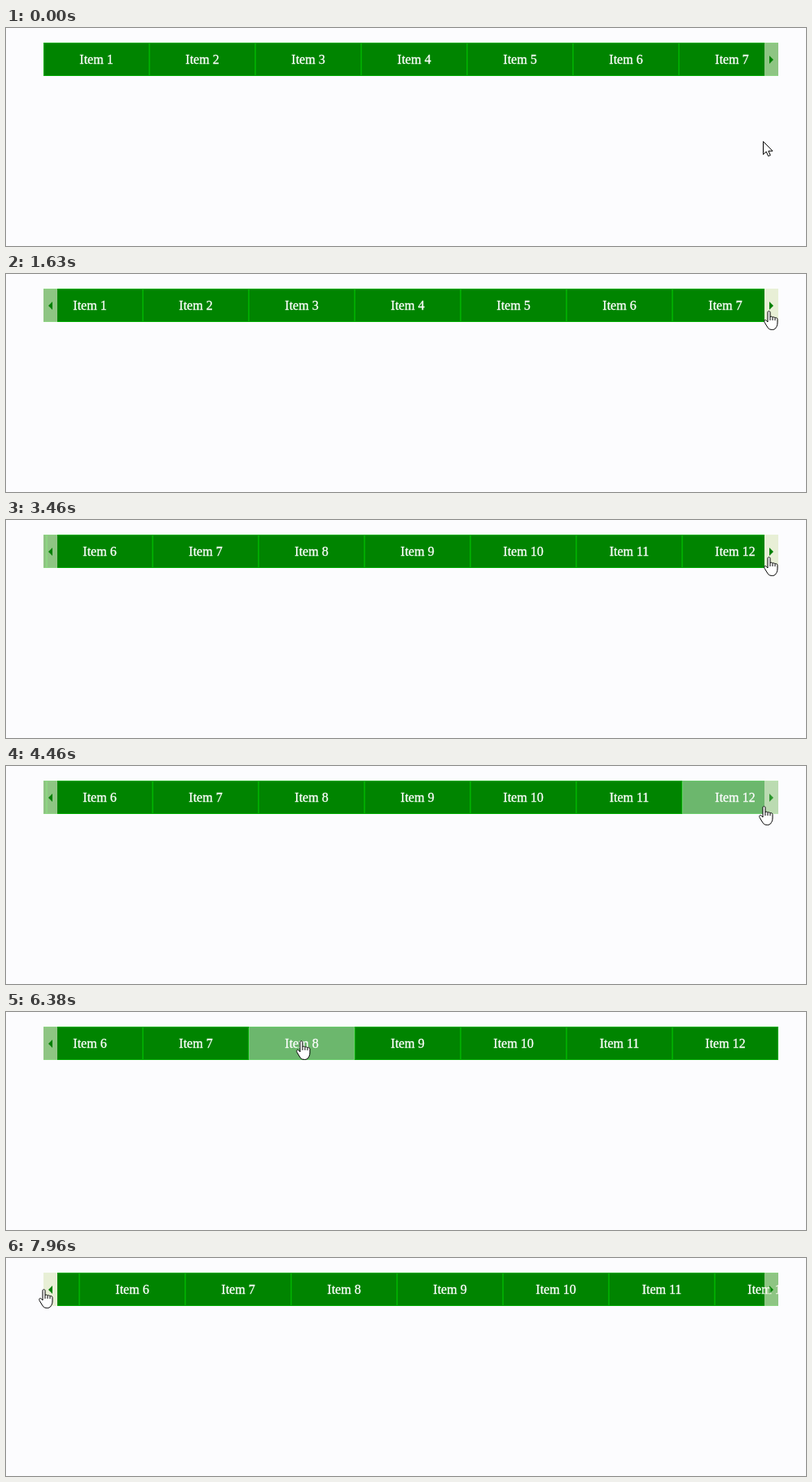
Recreate the animation shown at these times as an HTML page. Size 982x268 px, loop 8 s.

```html
<!DOCTYPE html>
<html lang="en">
<head>
<meta charset="utf-8">
<title>Scrolling menu</title>
<style>
  html, body { margin: 0; width: 100%; height: 100%; overflow: hidden; background: #fcfcfe; }
  svg { display: block; }
  .item rect { fill: #008400; stroke: #0a0; }
  .item text { font: 16px "Liberation Serif", serif; fill: #fff; stroke: #fff; stroke-width: .3; text-anchor: middle; }
  .item.hover { opacity: .57; }
  .arrow { opacity: .58; }
  .arrow.hover { opacity: .95; }
  .arrow rect { fill: #f5f5e2; }
  .arrow path { fill: #008000; }
  .cursor { fill: #fff; stroke: #000; stroke-linejoin: round; }
</style>
</head>
<body>
<svg width="982" height="268" viewBox="0 0 982 268">
  <clipPath id="bar"><rect x="46" y="18" width="902" height="41"/></clipPath>
  <g clip-path="url(#bar)">
    <g id="strip"></g>
    <g id="left" class="arrow"><rect x="46" y="18" width="17" height="41"/><path d="M57 34v10l-5-5z"/></g>
    <g id="right" class="arrow"><rect x="931" y="18" width="17" height="41"/><path d="M937 34v10l5-5z"/></g>
  </g>
  <path id="pointer" class="cursor" d="M.5.5V16.5L4.2 13 6.7 18.5 9.3 17.4 6.9 12.2H12Z"/>
  <path id="hand" class="cursor" d="M-1 2.2C-1 .2 2 .2 2 2.2V8C2.3 6.8 4.8 7 5 8.5 5.4 7.4 7.8 7.8 8 9.2 8.6 8.2 11 8.7 11 10.5V15C11 19 9.5 20 8.5 22Q7 23.5 4.5 23.5 1 23.5-.5 21.5C-2 19-3.5 17-4.8 14.5-6.2 11.8-3.8 10.8-2.5 12.3L-1 14ZM2 8v4M5 8.5v3.5M8 9.2v3"/>
</svg>
<script>
const LOOP = 8000, LEFT = 46, RIGHT = 948, TOP = 18, BOTTOM = 59;
const ITEM = 130, COUNT = 12, ARROW = 17;
const MAX_SCROLL = COUNT * ITEM - (RIGHT - LEFT);
const SPEED = .4225, FAST_SPEED = .8; // px per ms

const byId = id => document.getElementById(id);
const strip = byId('strip'), left = byId('left'), right = byId('right');
const pointer = byId('pointer'), hand = byId('hand');

strip.innerHTML = Array.from({ length: COUNT }, (_, i) => {
  const x = LEFT + i * ITEM;
  return `<g class="item">
    <rect x="${x + .5}" y="${TOP + .5}" width="${ITEM - 1}" height="${BOTTOM - TOP - 1}"/>
    <text x="${x + ITEM / 2}" y="44">Item ${i + 1}</text></g>`;
}).join('');
const items = [...strip.children];

// Milliseconds of the span from..to that have passed at time t.
const elapsed = (t, from, to) => Math.min(Math.max(t - from, 0), to - from);

// Two presses on the right arrow, a click on the last item, a press on the left arrow.
function scrollAt(t) {
  const pressed = elapsed(t, 1611, 2030) + elapsed(t, 2310, 3420);
  const toEnd = elapsed(t, 4930, 5250) / 320;
  const pos = SPEED * pressed;
  return Math.round(pos + (MAX_SCROLL - 646) * toEnd - FAST_SPEED * elapsed(t, 7895, 7960));
}

const moves = [
  { from: 40, to: 800, x: 938, y: 52 },
  { from: 800, to: 1130, x: 936, y: 45 },
  { from: 3500, to: 4460, x: 930, y: 49 },
  { from: 4460, to: 5250, x: 915, y: 38 },
  { from: 5440, to: 6380, x: 362, y: 35 },
  { from: 6380, to: 7200, x: 46, y: 38 }
];

function cursorAt(t) {
  let x = 929, y = 139;
  for (const move of moves) {
    const p = elapsed(t, move.from, move.to) / (move.to - move.from);
    x += (move.x - x) * p;
    y += (move.y - y) * p;
  }
  return [Math.round(x), Math.round(y)];
}

function show(el, visible) {
  el.style.display = visible ? '' : 'none';
}

function draw(t) {
  const scroll = scrollAt(t);
  const [x, y] = cursorAt(t);
  const inside = x >= LEFT && x < RIGHT && y >= TOP && y < BOTTOM;
  const canLeft = scroll > 0, canRight = scroll < MAX_SCROLL;
  const onLeft = inside && canLeft && x < LEFT + ARROW;
  const onRight = inside && canRight && x >= RIGHT - ARROW;
  const hovered = inside && !onLeft && !onRight ? Math.floor((x - LEFT + scroll) / ITEM) : -1;

  strip.setAttribute('transform', `translate(${-scroll} 0)`);
  items.forEach((item, i) => item.classList.toggle('hover', i === hovered));
  left.classList.toggle('hover', onLeft);
  right.classList.toggle('hover', onRight);
  show(left, canLeft);
  show(right, canRight);
  show(hand, inside);
  show(pointer, !inside);
  (inside ? hand : pointer).setAttribute('transform', `translate(${x} ${y})`);
}

const start = performance.now();
function tick() {
  draw((performance.now() - start) % LOOP);
  requestAnimationFrame(tick);
}
tick();
</script>
</body>
</html>
```
